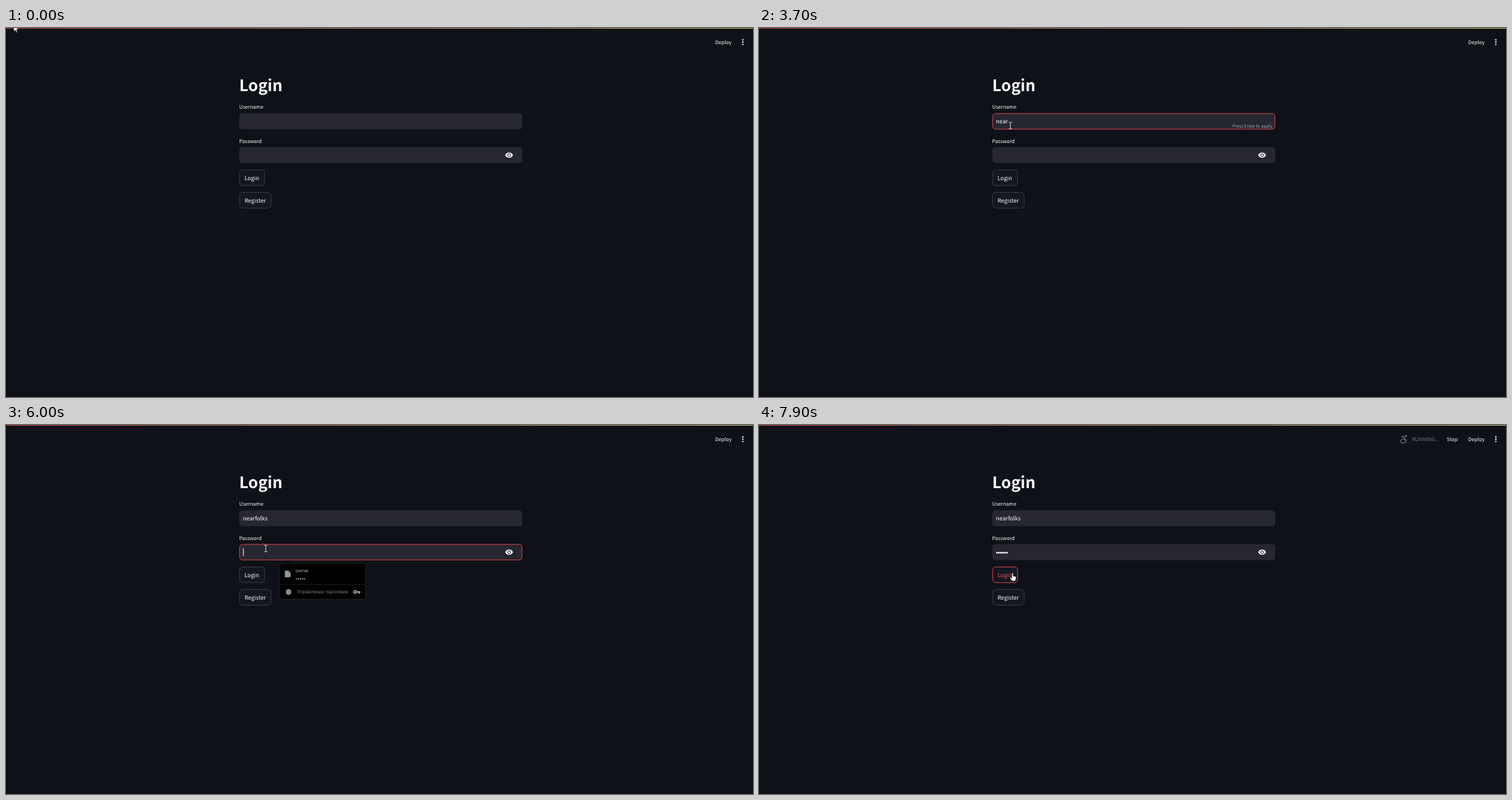
These frames come from a looping animation (1065x526 px, 8000 ms). An HTML page:

```html
<!DOCTYPE html>
<html lang="en">
<head>
<meta charset="utf-8">
<title>Login</title>
<style>
  html, body { margin: 0; width: 100%; height: 100%; overflow: hidden; background: #0e1117; }
  svg { display: block; width: 100%; height: 100%; }
  text {
    font-family: 'Noto Sans CJK JP', 'Noto Sans CJK SC', 'Noto Sans CJK KR', 'Noto Sans CJK', sans-serif;
    font-size: 8.2px; fill: #fafafa; text-rendering: geometricPrecision; white-space: pre;
  }
  .title { font-size: 22.55px; font-weight: 700; }
  .small { font-size: 7.2px; }
  .hint { font-size: 6.16px; fill: #a9a9ad; text-anchor: end; }
  .menu { font-family: Roboto, sans-serif; font-size: 6.88px; }
  .field { fill: #262730; }
  .ring { fill: none; stroke: #ff4b4b; stroke-width: .75; }
  .button { fill: #131720; stroke: #41444c; stroke-width: .8; }
  .hot.button { stroke: #ff4b4b; }
  text.hot { fill: #ff4b4b; }
</style>
</head>
<body>
<svg viewBox="0 0 1065 526" preserveAspectRatio="none">
  <defs>
    <linearGradient id="bar">
      <stop offset="0" stop-color="#ff4b4b"/>
      <stop offset="1" stop-color="#fffd80"/>
    </linearGradient>
  </defs>
  <rect width="1065" height="526" fill="#0e1117"/>
  <rect width="1065" height="1" fill="url(#bar)" opacity=".65"/>

  <g id="running">
    <g fill="none" stroke="#6f7177" stroke-width="1.3" stroke-linecap="round" stroke-linejoin="round">
      <path d="M916.5 17.2l2-1 2.4 1.2-1.8 3.2 3.6.3-.4 3.8"/>
      <path d="M917.2 20.1a3 3 0 1 0 3.6 4.2"/>
    </g>
    <circle cx="922.5" cy="15.6" r="1.4" fill="#6f7177"/>
    <text class="small" x="931" y="23" style="fill:#777980">RUNNING...</text>
    <text class="small" x="980.6" y="23">Stop</text>
  </g>
  <text class="small" x="1011" y="23">Deploy</text>
  <g fill="#fafafa">
    <circle cx="1050.5" cy="16.9" r="1.1"/>
    <circle cx="1050.5" cy="20.2" r="1.1"/>
    <circle cx="1050.5" cy="23.5" r="1.1"/>
  </g>

  <text class="title" x="332.6" y="89.6">Login</text>

  <text class="small" x="332.6" y="115.4">Username</text>
  <rect class="field" x="332.6" y="121.6" width="403.4" height="23" rx="4.6"/>
  <rect class="ring" id="ring0" x="333" y="122" width="402.6" height="22.2" rx="4.3"/>
  <text id="name" x="337.8" y="136.4"></text>
  <text class="hint" id="hint0" x="732" y="142">Press Enter to apply</text>

  <text class="small" x="332.6" y="163.5">Password</text>
  <rect class="field" x="332.6" y="169.7" width="403.4" height="23" rx="4.6"/>
  <rect class="ring" id="ring1" x="333" y="170.1" width="402.6" height="22.2" rx="4.3"/>
  <g id="dots" fill="#fafafa"></g>
  <path transform="translate(711.2 175.2) scale(.505)" fill="#fafafa" d="M12 4.5C7 4.5 2.73 7.61 1 12c1.73 4.39 6 7.5 11 7.5s9.27-3.11 11-7.5c-1.73-4.39-6-7.5-11-7.5zM12 17c-2.76 0-5-2.24-5-5s2.24-5 5-5 5 2.24 5 5-2.24 5-5 5zm0-8c-1.66 0-3 1.34-3 3s1.34 3 3 3 3-1.34 3-3-1.34-3-3-3z"/>
  <text class="hint" id="hint1" x="732" y="190">Press Enter to apply</text>
  <rect id="caret" width=".9" height="11.6" fill="#fafafa"/>

  <rect class="button" id="login" x="333" y="202.3" width="35.7" height="22.4" rx="4.5"/>
  <text id="loginText" x="339.9" y="216.5">Login</text>
  <rect class="button" x="333" y="234.4" width="45" height="22.4" rx="4.5"/>
  <text x="339.9" y="248.6">Register</text>

  <g id="popup">
    <path d="M397 197.4l5-4.4 5 4.4z" fill="#060709"/>
    <rect x="390" y="197.4" width="122.7" height="51" rx="3" fill="#010102" stroke="#292b2f" stroke-width=".7"/>
    <path d="M390.4 227.4H512.4" stroke="#26272a" stroke-width=".7"/>
    <path d="M398.6 207.5h4.2l2.9 2.9v5.6q0 1-1 1h-6.1q-1 0-1-1v-7.5q0-1 1-1z" fill="#96989b"/>
    <path d="M402.6 207.7v2.9h2.9" fill="none" stroke="#5c5e61" stroke-width=".6"/>
    <text class="menu" x="412.8" y="209.6" style="fill:#a8a8a8">owner</text>
    <g id="saved" fill="#a8a8a8"></g>
    <circle cx="402.8" cy="238" r="3.9" fill="#8b8c8e"/>
    <text class="menu" x="414.8" y="240.4" style="fill:#747578">Управление паролями</text>
    <path transform="translate(494.6 232.4) scale(.46)" fill="#9c9c9d" d="M12.65 10C11.83 7.67 9.61 6 7 6c-3.31 0-6 2.69-6 6s2.69 6 6 6c2.61 0 4.83-1.67 5.65-4H17v4h4v-4h2v-4H12.65zM7 14c-1.1 0-2-.9-2-2s.9-2 2-2 2 .9 2 2-.9 2-2 2z"/>
  </g>

  <g id="mouse">
    <path id="arrow" d="M0 0V9.7L2.2 7.6 3.7 11 5.2 10.4 3.8 7.1H6.9Z" fill="#fff" stroke="#000" stroke-width=".5"/>
    <path id="beam" d="M-2.2 -4.6H-.6L0 -4.2 .6 -4.6H2.2M0 -4.2V4.2M-2.2 4.6H-.6L0 4.2 .6 4.6H2.2" fill="none" stroke="#e6e6e8" stroke-width=".85"/>
    <path id="hand" d="M-.9 .9a.9.9 0 0 1 1.8 0V4.4l3.2.8q1.3.3 1.1 1.6L4.5 10q-.2 1.5-1.2 1.5H-.2q-.8 0-1.3-.8L-3.4 7.5q-.4-.9.4-1.1.6-.1 1.2.5l.9.9Z" fill="#fff" stroke="#111" stroke-width=".5"/>
  </g>
</svg>
<script>
const LOOP = 8000, TICK = 100;
const USER = 'nearfolks';
const USER_KEYS = [2300, 2600, 3100, 3200, 3800, 4000, 4100, 4500, 4600];
const PASS_KEYS = [6400, 6400, 6500, 6700, 6800, 6900];
const FOCUS = [900, 6000], BLUR = 7600, BLINK = 500;
const PATH = [
  { from: 200, to: 800, a: [11, -4.5], b: [358.4, 139] },
  { from: 5400, to: 5800, a: [358.4, 139], b: [370.3, 176] },
  { from: 6900, to: 7300, a: [370.3, 176], b: [361.4, 210.8] }
];

const el = {};
document.querySelectorAll('[id]').forEach(n => el[n.id] = n);
const show = (node, on) => node.setAttribute('opacity', +on);
const within = (t, a, b) => t >= a && t < b;
const typed = (keys, t) => keys.filter(k => k <= t).length;

function addDots(group, count, x, y, step, r) {
  for (let i = 0; i < count; i++) {
    const dot = document.createElementNS('http://www.w3.org/2000/svg', 'circle');
    Object.entries({ cx: x + i * step, cy: y, r }).forEach(([k, v]) => dot.setAttribute(k, v));
    group.append(dot);
  }
}
addDots(el.dots, PASS_KEYS.length, 339.4, 182.1, 2.8, 1.3);
addDots(el.saved, 5, 414.2, 219.2, 2.8, .95);

function mouseAt(t) {
  let pos = PATH[0].a;
  for (const { from, to, a, b } of PATH) {
    if (t < from) break;
    const p = Math.min(1, (t - from) / (to - from));
    const e = p * p * (3 - 2 * p);
    pos = a.map((v, i) => v + (b[i] - v) * e);
  }
  return pos;
}

function drawMouse(t) {
  const [x, y] = mouseAt(t);
  const inField = x > 333 && (within(y, 121.6, 144.6) || within(y, 169.7, 192.7));
  const onLogin = within(x, 333, 368.8) && within(y, 202, 225);
  el.mouse.setAttribute('transform', `translate(${x} ${y})`);
  show(el.beam, inField);
  show(el.hand, onLogin);
  show(el.arrow, !inField && !onLogin);
  el.login.classList.toggle('hot', onLogin);
  el.loginText.classList.toggle('hot', onLogin);
}

function drawCaret(t, inPass, passCount) {
  const keys = inPass ? PASS_KEYS : USER_KEYS;
  const last = Math.max(FOCUS[+inPass], ...keys.filter(k => k <= t));
  const on = within(t, FOCUS[0], BLUR) && Math.floor((t - last) / BLINK) % 2 === 0;
  const offset = inPass ? passCount * 2.8 : el.name.getComputedTextLength();
  el.caret.setAttribute('x', 337.9 + offset);
  el.caret.setAttribute('y', inPass ? 175.4 : 127.3);
  show(el.caret, on);
}

function draw(time) {
  const t = Math.floor(time % LOOP / TICK) * TICK;
  const inPass = t >= FOCUS[1];
  const passCount = typed(PASS_KEYS, t);

  el.name.textContent = USER.slice(0, typed(USER_KEYS, t));
  [...el.dots.children].forEach((dot, i) => show(dot, i < passCount));

  show(el.ring0, within(t, FOCUS[0], FOCUS[1]) ? Math.min(1, .5 + (t - FOCUS[0]) / 400) : 0);
  show(el.ring1, within(t, FOCUS[1], BLUR));
  show(el.hint0, within(t, USER_KEYS[0], FOCUS[1]));
  show(el.hint1, within(t, PASS_KEYS[0], BLUR));
  show(el.popup, within(t, 6000, 6500) ? 1 : within(t, 6500, 6700) ? .5 : 0);
  show(el.running, within(t, 6100, 6200) || t >= 7900 ? 1 : t >= 7700 ? .12 : 0);

  drawCaret(t, inPass, passCount);
  drawMouse(t);
}

const start = performance.now();
function frame() {
  draw(performance.now() - start);
  requestAnimationFrame(frame);
}
frame();
</script>
</body>
</html>
```
